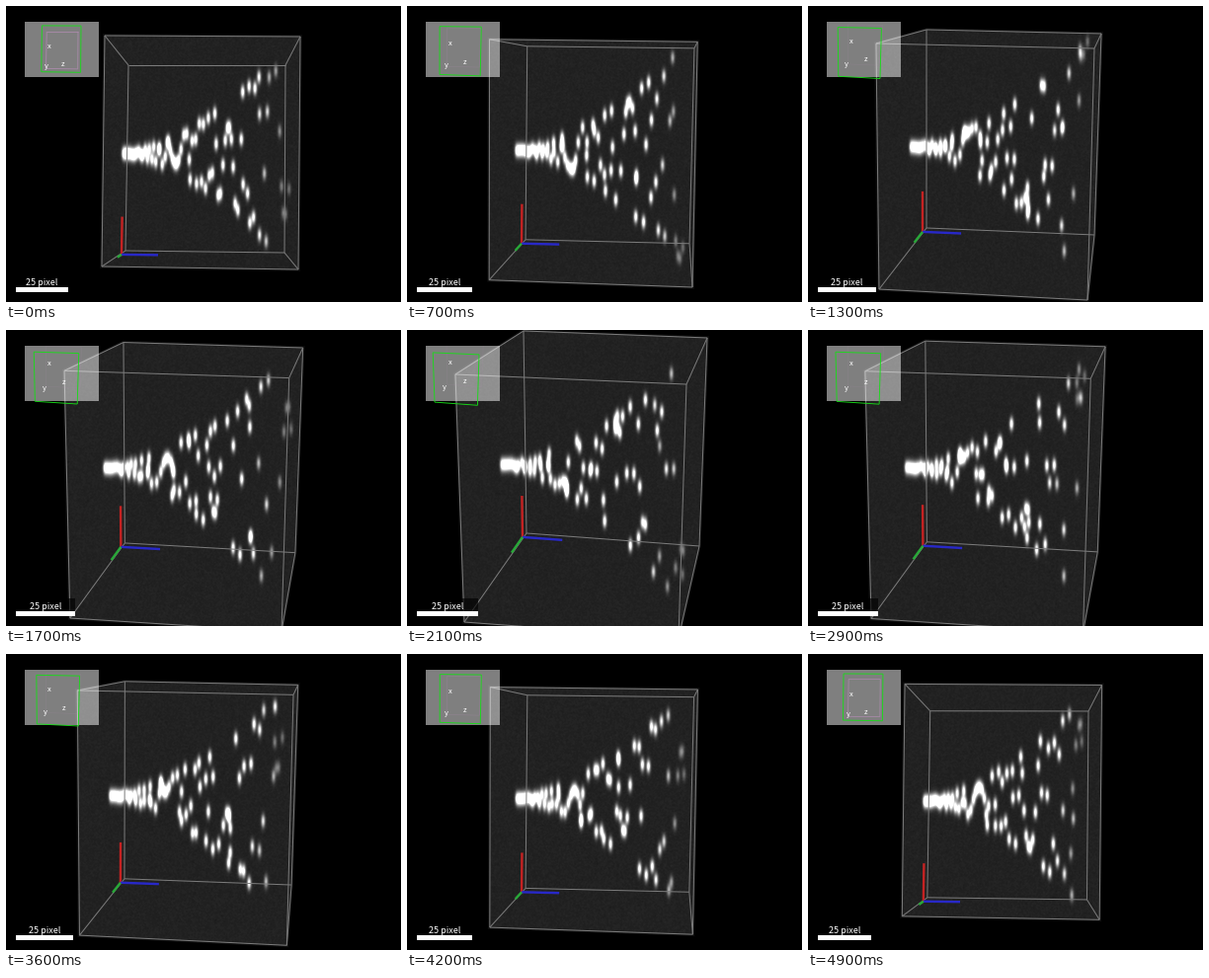
Write a matplotlib script that moves like this. It is 400 by 300 pixels and loops after 5000 ms.

```python
import itertools
import numpy as np
import matplotlib.pyplot as plt
from matplotlib.animation import FuncAnimation
from matplotlib.collections import LineCollection
from matplotlib.patches import Rectangle

W, H, DPI = 400, 300, 100
FRAMES, INTERVAL = 50, 100
PX = 72 / DPI

# Box corners: near TL, TR, BL, BR, then far TL, TR, BL, BR, at three swing values.
SWINGS = [0, 0.565, 0.913]
POSES = np.array([
    [(100, 30), (298, 31), (97, 264), (296, 267),
     (124, 60), (283, 60), (121, 248), (282, 250)],
    [(69, 38), (290, 43), (72, 287), (283, 298),
     (120, 24), (297, 28), (120, 225), (290, 232)],
    [(49, 45), (283, 55), (58, 296), (275, 312),
     (118, 1), (304, 8), (121, 206), (296, 219)],
], float)
CORNER_FIT = np.polyfit(SWINGS, POSES.reshape(3, -1), 2)

NEAR = [(0, 1), (1, 3), (3, 2), (2, 0)]
FAR = [(a + 4, b + 4) for a, b in NEAR]
SIDES = [(k, k + 4) for k in range(4)]

COLS, ROWS = np.arange(W) + 0.5, np.arange(H) + 0.5
GX, GY = np.meshgrid(COLS, ROWS)

# One spot per slice, on a spiral that flares out like a trumpet.
SPOT = np.arange(75)
SPOT_ALONG = 0.048 + 0.0122 * SPOT
SPOT_RADIUS = 0.5 * (SPOT / 74) ** 1.6
SPOT_LIGHT = 1.05 - 0.75 * np.clip((SPOT - 60) / 12, 0, 1)


def swing(frame):
    t = frame * INTERVAL / 1000
    return min(0.435 * t, 0.362 * (5 - t))


def corners_at(u):
    return (CORNER_FIT[0] * u * u + CORNER_FIT[1] * u + CORNER_FIT[2]).reshape(8, 2)


def project(corners, across, down, depth):
    """Interpolate inside the box; every coordinate runs from 0 to 1."""
    a, d, z = (np.asarray(q)[:, None] for q in (across, down, depth))

    def on_face(c):
        return (1 - d) * ((1 - a) * c[0] + a * c[1]) + d * ((1 - a) * c[2] + a * c[3])

    return (1 - z) * on_face(corners[:4]) + z * on_face(corners[4:])


def inside_margin(corners, pad):
    """Distance from each pixel to the padded silhouette, positive inside."""
    margin = np.full((H, W), 1e3)
    for a, b in itertools.permutations(corners, 2):
        normal = np.array([b[1] - a[1], a[0] - b[0]])
        normal /= np.hypot(*normal)
        if np.all((corners - a) @ normal <= 1e-6):
            margin = np.minimum(margin, pad - (GX - a[0]) * normal[0] - (GY - a[1]) * normal[1])
    return margin


def volume(frame, corners):
    rng = np.random.default_rng(100 + frame)
    noise = rng.standard_normal((H, W))
    for axis in (0, 1):
        noise = (noise + np.roll(noise, 1, axis)) / 1.5
    fog = (34 + 1.8 * noise) / 255 * np.clip(inside_margin(corners, 2.5) / 3, 0, 1)

    angle = np.pi / 24 * (SPOT - 48.5) ** 2 - 0.62 - 2 * np.pi * 22 / FRAMES * frame
    spots = project(corners, SPOT_ALONG,
                    0.495 + SPOT_RADIUS * np.sin(angle),
                    0.5 + SPOT_RADIUS * np.cos(angle))
    wide = np.exp(-((COLS - spots[:, :1]) / 1.4) ** 2 / 2)
    tall = np.exp(-((ROWS - spots[:, 1:]) / 4.4) ** 2 / 2)
    return np.clip(fog + (tall * SPOT_LIGHT[:, None]).T @ wide, 0, 1)


fig = plt.figure(figsize=(W / DPI, H / DPI), dpi=DPI, facecolor="black")
ax = fig.add_axes([0, 0, 1, 1])
ax.set_xlim(0, W)
ax.set_ylim(H, 0)
ax.axis("off")

picture = ax.imshow(np.zeros((H, W)), cmap="gray", vmin=0, vmax=1, aspect="auto",
                    extent=(0, W, H, 0), interpolation="nearest", zorder=0)


def lines(color, width, z):
    return ax.add_collection(
        LineCollection([], colors=color, linewidths=width * PX, zorder=z), autolim=False)


def label(text, size, z):
    return ax.text(0, 0, text, color="white", fontsize=size * PX, ha="center",
                   va="baseline", family="Noto Sans CJK JP", zorder=z)


box = lines("#7c7c7c", 1, 1)
triad = lines(["#c42222", "#2828c8", "#28a838"], 2.4, 2)
veil = ax.add_patch(Rectangle((19, 16), 75, 56, fc="white", alpha=0.5, lw=0, zorder=3))
mini_far = lines("#b48cb4", 0.7, 4)
mini_far.set_clip_path(veil)
mini_near = lines("#18dc18", 0.9, 5)
axis_names = [label(name, 7.5, 6) for name in "xyz"]
backing = ax.add_patch(Rectangle((10, 272), 54, 18, fc="black", alpha=0.65, lw=0, zorder=7))
bar = ax.add_patch(Rectangle((10, 285), 54, 5, fc="white", lw=0, zorder=8))
bar_text = label("25 pixel", 9, 9)


def segments(points, edges):
    return [points[list(edge)] for edge in edges]


def draw(frame):
    u = swing(frame)
    corners = corners_at(u)
    picture.set_data(volume(frame, corners))
    box.set_segments(segments(corners, NEAR + FAR + SIDES))

    base = corners[6]
    origin = base + (-4, 3.9)
    arms = [0.204 * (corners[4] - base), 0.23 * (corners[7] - base),
            0.175 * (corners[2] - base)]
    triad.set_segments([np.array([origin, origin + arm]) for arm in arms])

    mini = (corners - (198, 148)) * 0.2 + (56, 43.5)
    mini_far.set_segments(segments(mini, FAR))
    mini_far.set_alpha(max(0.15, 1 - 2.5 * u))
    mini_near.set_segments(segments(mini, NEAR))
    spots = [(44 - 0.8 * u, 43 - 9 * u), (41 - 3 * u, 63 - 3 * u), (58 + u, 61 - 8 * u)]
    for name, spot in zip(axis_names, spots):
        name.set_position(spot)

    width = 53.3 + 9.5 * u
    backing.set_width(width)
    bar.set_width(width)
    bar_text.set_position((10 + width / 2, 283))
    return [picture, box, triad, mini_far, mini_near, *axis_names, backing, bar, bar_text]


anim = FuncAnimation(fig, draw, frames=FRAMES, interval=INTERVAL,
                     init_func=lambda: draw(0), repeat=True, repeat_delay=0)
plt.show()
```
